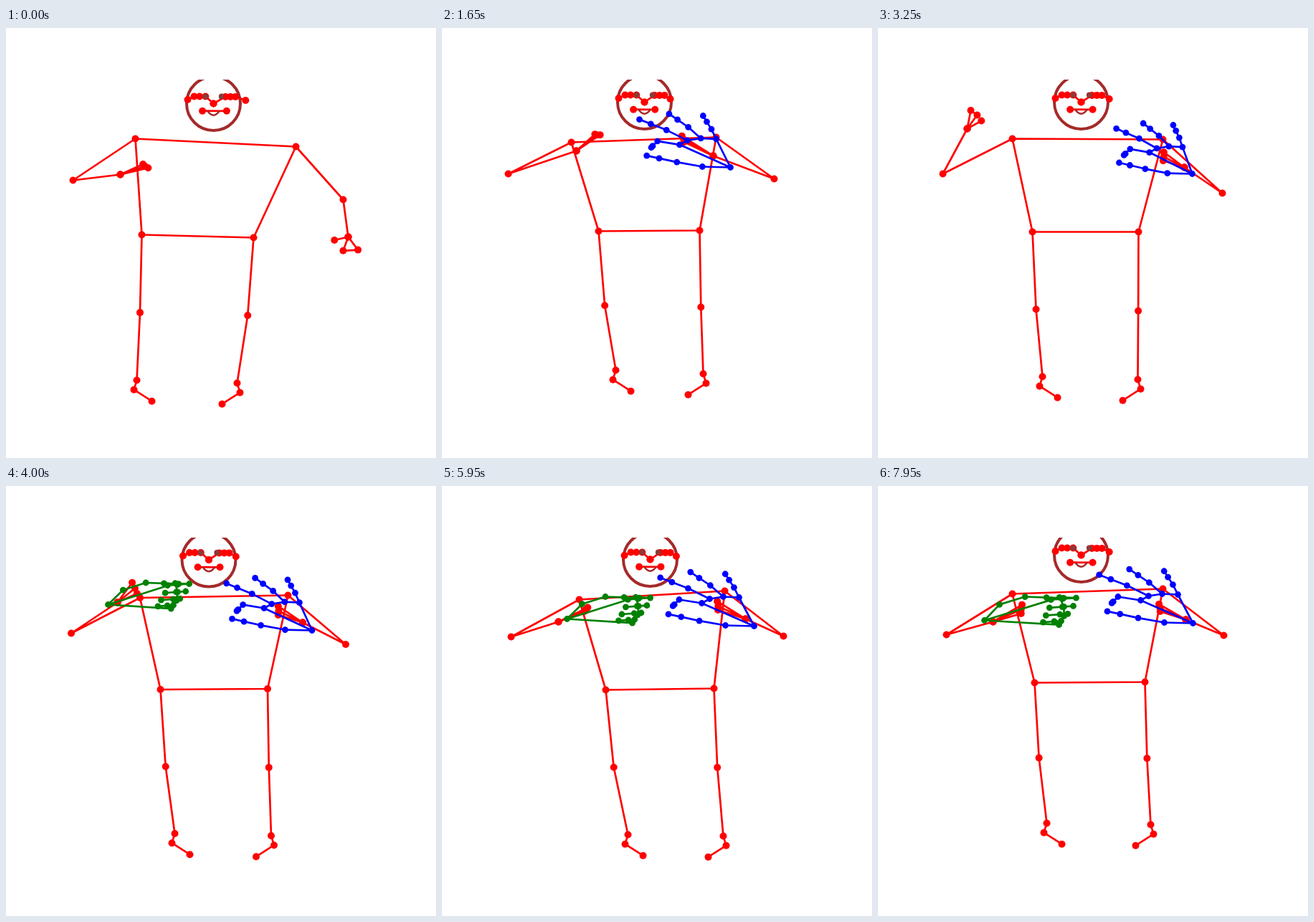
These frames come from a looping animation (600x600 px, 8000 ms). An HTML page with a canvas:

```html
<!DOCTYPE html>
<html lang="en">
<head>
<meta charset="utf-8">
<title>Pose skeleton</title>
<style>
  html, body { margin: 0; width: 100%; height: 100%; overflow: hidden; background: #fff; }
  canvas { display: block; width: 600px; height: 600px; }
</style>
</head>
<body>
<canvas id="stage" width="600" height="600"></canvas>
<script>
const ctx = document.getElementById('stage').getContext('2d');
const LOOP = 8000, STEP = 50;
const BLUE_FROM = 900, GREEN_FROM = 4000;
const RED = '#f00', BROWN = '#a52a2a', EYE = '#8f3838';

// Key poses. arm: shoulder, elbow, wrist; leg: hip, ankle;
// palm: aim and spread in degrees, reach; blue, green: offset from the wrist, size.
const poses = [
  { t: 0, nose: [289, 105],
    armR: [180, 154, 93, 212, 159, 204], palmR: [-19, -5.5, 37],
    armL: [404, 165, 470, 239, 477, 291], palmL: [110, 57, 21],
    legR: [189, 288, 182, 491], legL: [345, 292, 322, 495],
    blue: [24, 16, .98], green: [-13, 3, .86] },
  { t: 1650, nose: [282, 103],
    armR: [180, 159, 92, 203, 187, 171], palmR: [-38, -4, 37],
    armL: [382, 152, 463, 210, 378, 178], palmL: [209, -3.5, 48],
    legR: [218, 283, 242, 477], legL: [359, 282, 364, 482],
    blue: [24, 16, .98], green: [-13, 3, .86] },
  { t: 3250, nose: [283, 103],
    armR: [187, 154, 90, 203, 124, 140], palmR: [-54, 25, 24],
    armL: [397, 155, 480, 230, 427, 194], palmL: [207, -9.5, 33],
    legR: [215, 284, 229, 486], legL: [363, 284, 362, 490],
    blue: [11, 9, .87], green: [-13, 3, .86] },
  { t: 4750, nose: [282, 102],
    armR: [186, 157, 91, 207, 186, 184], palmR: [-24, 4, 40],
    armL: [389, 149, 467, 211, 400, 186], palmL: [204, -7, 43],
    legR: [215, 283, 241, 483], legL: [366, 281, 377, 485],
    blue: [15, 13, 1.01], green: [-13, 3, .86] },
  { t: 5950, nose: [290, 102],
    armR: [191, 158, 96, 210, 162, 189], palmR: [-24, 2, 42],
    armL: [394, 146, 476, 209, 423, 185], palmL: [205, -7, 43],
    legR: [228, 284, 259, 486], legL: [379, 282, 392, 488],
    blue: [12, 10, 1], green: [12, -4, .89] },
  { t: 6950, nose: [286, 97],
    armR: [184, 152, 84, 206, 158, 188], palmR: [-20.5, 5, 45],
    armL: [402, 141, 490, 204, 441, 184], palmL: [206, -6.5, 42],
    legR: [228, 276, 266, 473], legL: [386, 273, 409, 474],
    blue: [11, 6, .99], green: [-6, -3, 1] },
  { t: 7950, nose: [283, 96],
    armR: [187, 150, 95, 207, 160, 189], palmR: [-23.5, 7, 43.5],
    armL: [397, 143, 482, 208, 429, 186], palmL: [204, -6, 40],
    legR: [218, 274, 235, 470], legL: [372, 273, 380, 472],
    blue: [10, 5, 1], green: [-12, -2, 1.01] }
];

// Thumb to pinky: knuckle, first bone, taper, heading, and the bend after the first bone.
const finger = (x, y, bone, taper, heading, bend) => ({ x, y, bone, taper, heading, bend });
const blueHand = [
  finger(-40, -1, 37, .7, 190, 2),
  finger(-73, -32, 32, .3, 189, -55),
  finger(-62, -38, 33.5, .72, 206, -5),
  finger(-43, -41, 24, .78, 221, -7),
  finger(-21, -40, 15.6, .8, 243, -6)
];
const greenHand = [
  finger(21, -22, 37, .8, -17, 19),
  finger(104, -32, 23, .83, 2, 174),
  finger(110, -19, 13, 1.17, -4, 180),
  finger(110, -6, 6, 1.8, -30, 206),
  finger(103, 6, 6, 1.6, -60, 236)
];

const mix = (a, b, k) => a.map((v, i) => v + (b[i] - v) * k);
const add = ([x, y], dx, dy) => [x + dx, y + dy];
const points = flat => Array.from({ length: flat.length / 2 }, (_, i) => [flat[2 * i], flat[2 * i + 1]]);

function polar([x, y], degrees, length) {
  const a = degrees * Math.PI / 180;
  return [x + length * Math.cos(a), y + length * Math.sin(a)];
}

function poseAt(t) {
  const next = Math.max(1, poses.findIndex(p => p.t >= t));
  const a = poses[next - 1], b = poses[next];
  const k = (t - a.t) / (b.t - a.t);
  const p = {};
  for (const name in a) if (name !== 't') p[name] = mix(a[name], b[name], k);

  // The left forearm swings outwards on its way up, while the right elbow opens.
  const swing = Math.sin(Math.PI * Math.min(1, t / 900));
  const open = Math.sin(Math.PI * Math.min(1, t / 1650));
  p.armL = mix(p.armL, [0, 0, 20, 0, 70, -25].map((d, i) => p.armL[i] + d), swing);
  p.armR[2] -= 12 * open;
  return p;
}

function ink(color, width = 2.7) {
  ctx.strokeStyle = ctx.fillStyle = color;
  ctx.lineWidth = width;
}

function line(pts) {
  ctx.beginPath();
  pts.forEach(([x, y]) => ctx.lineTo(x, y));
  ctx.stroke();
}

function dot([x, y], radius) {
  ctx.beginPath();
  ctx.arc(x, y, radius, 0, 2 * Math.PI);
  ctx.fill();
}

function chain(pts, radius = 5) {
  line(pts);
  pts.forEach(p => dot(p, radius));
}

function drawFace(nose, shoulderSpan) {
  const [x, y] = nose;
  const earR = 36, earL = 36 + Math.max(0, shoulderSpan - 202) * .4;
  const turn = earL - 36;

  ink(BROWN, 4);
  ctx.beginPath();
  ctx.arc(x, y, 37.5, 0, 2 * Math.PI);
  ctx.stroke();

  ink(RED);
  const eyeR = [.31, .54, .75].map(f => add(nose, -earR * f, -10));
  const eyeL = [14, 21, 28].map(d => add(nose, d + turn * .3, -9.6));
  chain([nose, ...eyeR, add(nose, -earR, -5.5)]);
  chain([nose, ...eyeL, add(nose, earL, -4.5)]);
  chain([add(nose, -15.4, 10.2), add(nose, earL * .41, 10.3)]);

  ink(BROWN, 2.4);
  ctx.beginPath();
  ctx.moveTo(x - 8.5, y + 10);
  ctx.quadraticCurveTo(x, y + 22.5, x + 8.5, y + 10);
  ctx.stroke();
  ink(EYE);
  [-11.3, 11.3].forEach(d => dot(add(nose, d, -10), 4));
}

function drawArm(arm, [aim, spread, reach]) {
  const wrist = arm[2];
  const [pinky, index, thumb] = [1.08, .98, .94].map((f, i) => polar(wrist, aim + spread * (i - 1), reach * f));
  chain([...arm, pinky, index, wrist]);
  chain([wrist, thumb]);
}

function drawLeg([hip, ankle], side) {
  const knee = [hip[0] + (ankle[0] - hip[0]) * .36, hip[1] + (ankle[1] - hip[1]) * .535];
  const heel = add(ankle, side * 4, 13.2);
  chain([hip, knee, ankle, heel, add(heel, side * -25, 16)]);
}

function drawHand(color, fingers, wrist, [dx, dy, size]) {
  const root = add(wrist, dx, dy);
  const lean = (1 - size) * .9;
  const place = ([x, y]) => add(root, x * size - y * lean, y * (1 + size) / 2);
  const bones = fingers.map(f => {
    const joints = [[f.x, f.y]];
    for (let i = 0; i < 3; i++) {
      joints.push(polar(joints[i], f.heading + (i ? f.bend : 0), f.bone * f.taper ** i));
    }
    return joints.map(place);
  });
  const [thumb, index, middle, ring, pinky] = bones;
  ink(color);
  line([root, thumb[0]]);
  line([root, index[0], middle[0], ring[0], pinky[0], root]);
  dot(root, 4.4);
  bones.forEach(b => chain(b, 4.4));
}

function draw(t) {
  const p = poseAt(t);
  const [armR, armL, legR, legL] = [p.armR, p.armL, p.legR, p.legL].map(points);
  ctx.clearRect(0, 0, 600, 600);
  ctx.save();
  ctx.beginPath();
  ctx.rect(75, 72, 465, 462);
  ctx.clip();
  ctx.translate(.5, .5);
  ctx.lineJoin = 'round';

  drawFace(p.nose, armL[0][0] - armR[0][0]);
  ink(RED);
  line([legR[0], armR[0], armL[0], legL[0], legR[0]]);
  drawArm(armR, p.palmR);
  drawArm(armL, p.palmL);
  drawLeg(legR, -1);
  drawLeg(legL, 1);
  if (t >= GREEN_FROM) drawHand('#008000', greenHand, armR[2], p.green);
  if (t >= BLUE_FROM) drawHand('#00f', blueHand, armL[2], p.blue);
  ctx.restore();
}

const start = performance.now();
function tick() {
  const t = (performance.now() - start) % LOOP;
  draw(Math.floor(t / STEP) * STEP);
  requestAnimationFrame(tick);
}
tick();
</script>
</body>
</html>
```
